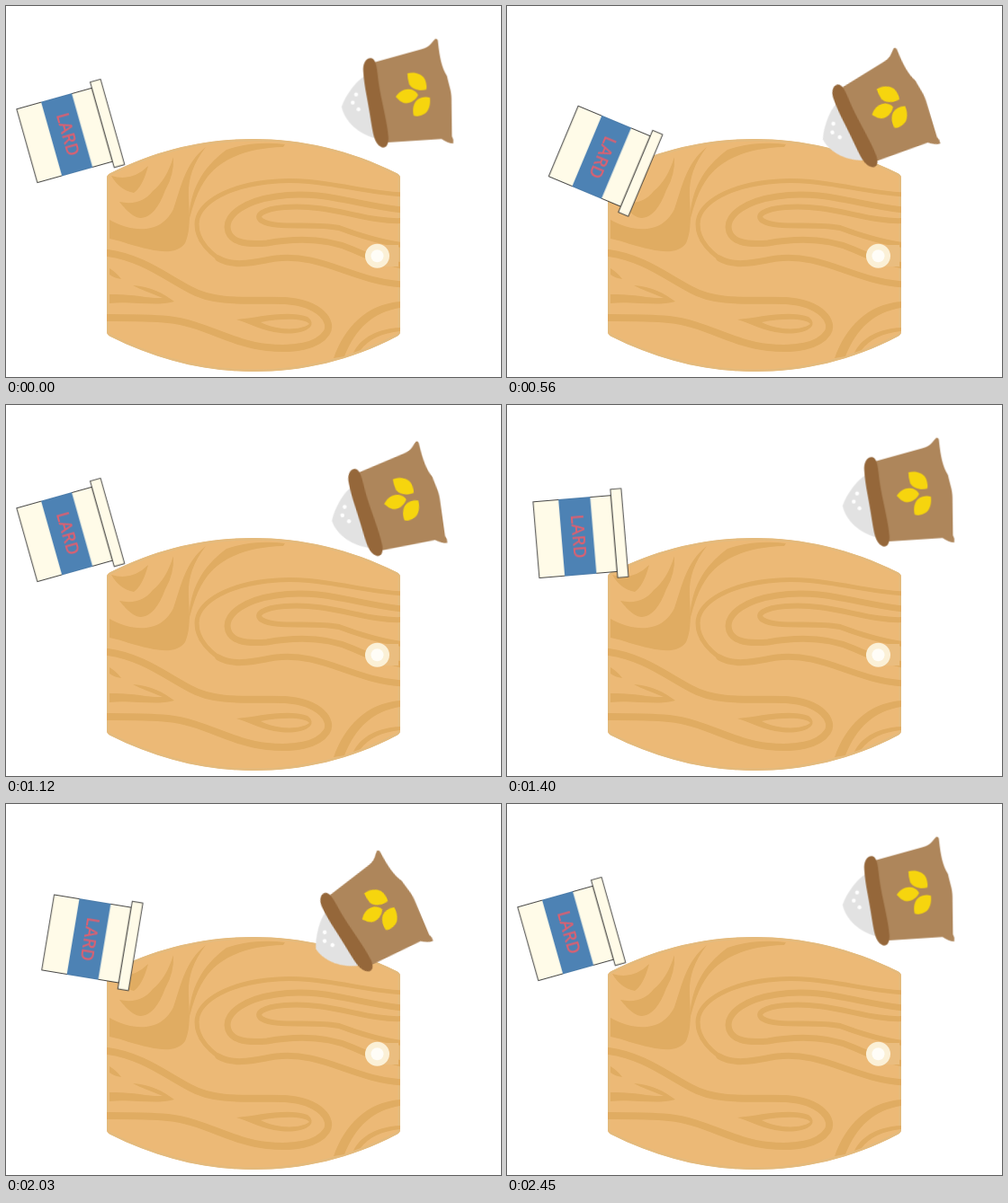
Write an HTML page without scripts that moves like this. It is 550 px wide and 413 px high and loops after 2590 ms.

```html
<!DOCTYPE html>
<html lang="en">
<head>
<meta charset="utf-8">
<title>Baking ingredients</title>
<style>
  html, body { margin: 0; width: 100%; height: 100%; overflow: hidden; background: #fff; }
  svg { display: block; width: 550px; height: 413px; }

  .board { fill: #ecb976; }
  .edge { fill: none; stroke: #e4ba7c; stroke-width: 5; }
  .grain { fill: #e0ac62; }
  .rings { fill: none; stroke: #e0ac62; stroke-linecap: round; }

  .tub { fill: #fffbe8; stroke: #333; stroke-width: .9; }
  .band { fill: #4d82b4; }
  .label { font: 600 19px "Open Sans", "Noto Sans", sans-serif; fill: #dc6070; text-anchor: middle; }

  .flour { fill: #e2e2e2; }
  .sack { fill: #ae865b; }
  .rim { fill: #95673a; }
  .leaf { fill: #f6d50e; }

  /* 37 ticks of 70 ms; every swing takes 8 ticks out and 7 back */
  #jar, #bag { animation: 2590ms -4ms infinite; }
  #jar { animation-name: jar; }
  #bag { animation-name: bag; }

  @keyframes jar {
    0%, 43.2432%, 89.1892%, 100% {
      transform: translate(68px, 143.15px) rotate(-15.7deg);
      animation-timing-function: step-end;
    }
    2.7027%, 48.6486% {
      transform: translate(68px, 143.15px) rotate(-15.7deg);
      animation-timing-function: steps(8);
    }
    24.3243% {
      transform: translate(110.9px, 172px) rotate(28.2deg);
      animation-timing-function: steps(7);
    }
    70.2703% {
      transform: translate(110.7px, 156px) rotate(28.2deg);
      animation-timing-function: steps(7);
    }
  }
  @keyframes bag {
    0%, 48.6486%, 94.5946%, 100% {
      transform: translate(454.3px, 98.7px) rotate(0deg);
      animation-timing-function: step-end;
    }
    8.1081%, 54.0541% {
      transform: translate(454.3px, 98.7px) rotate(0deg);
      animation-timing-function: steps(8);
    }
    29.7297%, 75.6757% {
      transform: translate(408px, 121.6px) rotate(-25.9deg);
      animation-timing-function: steps(7);
    }
  }
</style>
</head>
<body>
<svg viewBox="0 0 550 413">
  <defs>
    <path id="outline" d="M112 191Q112 188 116 186C170 159 222 148 275 148S382 160 434 186Q438 188 438 191V363Q438 366 434 368C382 395 330 407 275 407S168 394 116 368Q112 366 112 363Z"/>
    <clipPath id="inside"><use href="#outline"/></clipPath>
  </defs>

  <g clip-path="url(#inside)">
    <use href="#outline" class="board"/>
    <use href="#outline" class="edge"/>
    <g class="grain">
      <path d="M117 189Q140 196 158 178Q152 201 142 208Q126 205 117 189Z"/>
      <path d="M126 218Q150 223 163 206Q178 194 186 168Q187 188 177 205Q166 235 150 236Q140 236 126 218Z"/>
      <path d="M115 238C140 252 172 255 186 226C195 200 199 175 222 157C206 178 202 195 203 214C204 235 205 250 199 264C190 276 174 274 160 271C140 267 130 262 115 259Z"/>
      <path d="M203 240C204 205 218 180 245 160Q275 150 310 154L308 157C268 158 240 170 224 190C212 206 208 222 203 240Z"/>
      <path d="M115 292Q123 297 128 304Q120 303 115 299Z"/>
      <path d="M141 311C160 312 175 320 187 329C165 335 140 328 115 331V321C140 320 160 326 174 325C160 319 150 316 141 311Z"/>
      <path fill-rule="evenodd" d="M256 349C280 347 312 338 335 346C348 356 332 367 305 364C285 362 273 354 256 349ZM283 352C300 361 326 362 337 354C331 347 305 348 283 352Z"/>
      <path d="M364 392C376 358 400 332 438 329V336C408 341 389 358 376 390Z"/>
      <path d="M386 386C394 369 414 359 438 358V362C418 364 403 371 394 383Z"/>
    </g>
    <g class="rings">
      <path stroke-width="5" d="M440 210C390 207 340 189 290 196C240 202 212 222 212 243C212 260 225 273 236 281"/>
      <path stroke-width="7" d="M236 281C255 292 280 284 300 281C350 275 385 306 440 310"/>
      <path stroke-width="7" d="M440 227C390 222 350 204 300 212C265 217 246 232 246 246C247 263 265 266 290 264C330 257 360 260 385 271S415 284 440 289"/>
      <path stroke-width="6" d="M440 239C400 241 360 220 310 224C285 226 276 233 284 239C300 249 340 241 370 247Q410 262 440 266"/>
      <path stroke-width="8" d="M113 275C150 280 175 300 205 316C235 333 280 326 310 328C350 331 364 352 356 364C346 379 320 383 290 380C250 376 220 353 180 349C160 347 140 347 113 347"/>
    </g>
    <path fill="#eabd7f" d="M412 266H436V290H412Z"/>
    <circle cx="412.5" cy="278.3" r="13.5" fill="#fbf0d6"/>
    <circle cx="412.5" cy="278.3" r="7" fill="#fffdf7"/>
  </g>

  <g id="jar">
    <rect class="tub" x="-46.3" y="-42.5" width="86.6" height="85"/>
    <rect class="band" x="-18.1" y="-42.9" width="35.4" height="85.8"/>
    <rect class="tub" x="40.3" y="-49.3" width="12" height="98.6"/>
    <text class="label" transform="translate(-6 0) rotate(90)">LARD</text>
  </g>

  <g id="bag">
    <g transform="translate(-454.3 -98.7)">
      <path class="flour" d="M400 77C389 83 377 100 373 112C376 129 393 143 410 147Z"/>
      <g fill="#fff">
        <circle cx="389" cy="98.5" r="2.2"/>
        <circle cx="385.3" cy="107.5" r="2.2"/>
        <circle cx="391.7" cy="115" r="2.2"/>
      </g>
      <path class="sack" d="M408 63L462 48C471 46 474 39 477 36.5Q480 36 480 40C482 58 484 68 490 78C492 88 495 94 495 103L495.5 145Q498 149 497 153Q491 153 484 148L422 152Z"/>
      <path class="rim" d="M397 73C396 63 401 57 406 58C412 60 412 70 414 85C417 106 424 130 425 147C425 155 422 159 417 157C409 153 408 143 405 125C402 104 398 90 397 73Z"/>
      <g class="leaf">
        <path d="M446 75C453 73 463 75 466 83Q468 89 467 93C460 95 451 93 448 87Q446 81 446 75Z"/>
        <path d="M433 101C437 94 445 91 451 93Q456 95 458 99C455 105 449 109 442 108Q437 106 433 101Z"/>
        <path d="M453 122C451 115 453 106 459 103Q465 100 471 102C472 109 470 117 465 120Q459 124 453 122Z"/>
      </g>
    </g>
  </g>
</svg>
</body>
</html>
```
